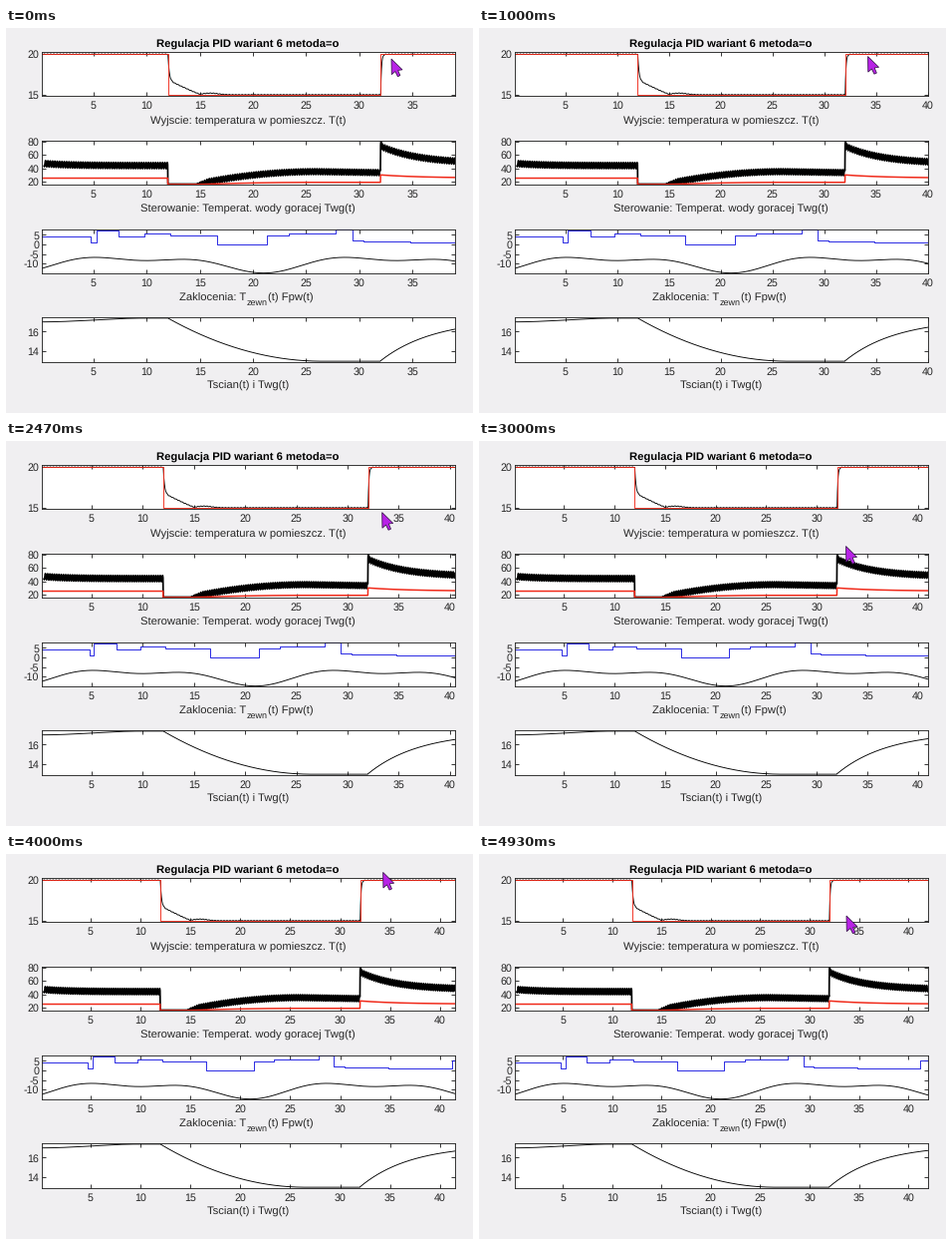
Recreate the animation shown at these times as a matplotlib script. Size 469 px wide and 386 px high, loop 4.99 s.

```python
import numpy as np
import matplotlib.pyplot as plt
from matplotlib.animation import FuncAnimation
from matplotlib.patches import Polygon

W, H, DPI = 469, 386, 64
PX = 72 / DPI                      # points per pixel
LOOP, FRAMES = 4990, 75
T0, DROP, RISE = 0.1, 12, 32       # start and the two set point changes
INK, RED = "#262626", "#f02818"
MID = 243.2

plt.rcParams.update({"font.family": "Liberation Sans",
                     "text.hinting": "none", "axes.unicode_minus": False})
fig = plt.figure(figsize=(W / DPI, H / DPI), dpi=DPI, facecolor="#f0eff1")


def panel(row, ylim, yticks):
    bottom = 68.3 + 88.8 * row
    ax = fig.add_axes([35.5 / W, 1 - bottom / H, 415.5 / W, 44.3 / H])
    ax.set_ylim(*ylim)
    ax.set_yticks(yticks)
    ax.tick_params(direction="in", top=True, right=True, length=4 * PX,
                   width=0.9 * PX, color=INK, labelcolor=INK,
                   labelsize=10.6 * PX)
    ax.tick_params(axis="x", pad=4.8 * PX)
    ax.tick_params(axis="y", pad=2.2 * PX)
    for side in ax.spines.values():
        side.set(linewidth=0.9 * PX, color=INK)
    return ax


def phases(before, between, after):
    return np.where(t < DROP, before, np.where(t < RISE, between, after))


def decay(start, tau):
    return np.exp(-np.clip(t - start, 0, None) / tau)


def draw(ax, x, y, color="black", width=0.9, **kw):
    ax.plot(x, y, color=color, linewidth=width * PX, **kw)


t = np.arange(T0, 42.3, 0.02)

# Room temperature and its set point
room = panel(0, (14.83, 20.28), [15, 20])
s = t - DROP
cooling = (15 + 3.2 * decay(DROP, 0.12) + 1.8 * np.clip(1 - s / 3, 0, 1)
           + 0.2 * np.exp(-(s - 4) ** 2))
draw(room, t, phases(20, cooling, 20 - 5 * decay(RISE, 0.08))
     + 0.04 * np.sin(2 * np.pi * t / 0.3))
draw(room, [T0, DROP, RISE, 43], [20, 15, 20, 20], RED,
     drawstyle="steps-post")

# Heating water
water = panel(1, (15.5, 81.5), [20, 40, 60, 80])
climb = 1 - np.clip((26 - t) / 11.3, 0, 1) ** 2
mean = phases(44 + 3.5 * decay(0, 2.5),
              16.5 + 18.5 * climb - 0.25 * np.clip(t - 26, 0, None),
              47 + 26 * decay(RISE, 3.6))
amp = phases(4.7, 4.5 * np.clip((t - 14.6) / 1.2, 0, 1), 4.7)
band = mean + amp * np.sin(2 * np.pi * t / 0.22)
band[np.abs(t - RISE - 0.04) < 0.03] = 80
band[t < 0.35] = np.nan
draw(water, t, band, width=1.7)
draw(water, t, phases(25.3, 15.8 + 3.2 * climb,
                      25.5 + 4.6 * decay(RISE, 4)), RED, 1.5)

# Disturbances
noise = panel(2, (-15.2, 8.1), [-10, -5, 0, 5])
edges = [T0, 4.78, 5.25, 7.4, 9.75, 12.2, 16.6, 21.35, 23.4, 27.8, 29.35,
         30.4, 34.8, 41.2, 43]
flow = [4.3, 1, 7.6, 4.3, 6, 4.5, 0, 4.7, 6, 7.9, 2.3, 1.5, 0.8, 5.3, 5.3]
draw(noise, edges, flow, "#1818e0", drawstyle="steps-post")
u = 2 * np.pi * (t - 9.7) / 23.5
draw(noise, t, -9.92 + 3.25 * np.cos(u) - 1.83 * np.cos(2 * u)
     - 0.8 * np.sin(u) + 0.25 * np.sin(2 * u))

# Wall temperature
wall = panel(3, (12.84, 17.47), [14, 16])
draw(wall, t, phases(17.22 - 0.2 * np.cos(np.pi * np.clip(t / 10, 0, 1)),
                     12.9 + 4.52 * np.clip((26.5 - t) / 14.5, 0, 1) ** 2,
                     12.95 + 4.4 * (1 - decay(RISE, 5))))

# Captions and pointer, in pixels from the top left corner
stage = fig.add_axes([0, 0, 1, 1], zorder=5)
stage.set(xlim=(0, W), ylim=(H, 0))
stage.axis("off")
LABEL = dict(color=INK, fontsize=11.3 * PX)


def caption(y, text, **kw):
    stage.text(MID, y, text, ha="center", va="baseline", **{**LABEL, **kw})


caption(19.6, "Regulacja PID wariant 6 metoda=o", color="black",
        weight="bold")
caption(96.4, "Wyjscie: temperatura w pomieszcz. T(t)")
caption(185.1, "Sterowanie: Temperat. wody goracej Twg(t)")
caption(361.8, "Tscian(t) i Twg(t)")

# Caption with a subscript, each piece placed after the one before
head = stage.text(174.5, 273.8, "Zaklocenia: T", va="baseline", **LABEL)
sub = stage.annotate("zewn", (1, 0), xycoords=head, xytext=(0, -4 * PX),
                     textcoords="offset points", va="bottom", color=INK,
                     fontsize=9 * PX)
stage.annotate("(t) Fpw(t)", (1, 0), xycoords=(sub, head), va="bottom",
               **LABEL)

ARROW = 0.92 * np.array([(0, 0), (0.3, 17), (4.2, 13.6), (7, 19.2),
                         (9.6, 18), (7.2, 12.4), (12, 11.8)])
pointer = Polygon(ARROW, facecolor="#b822e6", edgecolor="#3c1850",
                  linewidth=0.8 * PX, joinstyle="miter")
stage.add_patch(pointer)

# Pointer path: frame, x, y
PATH = np.array([(11, 387, 31), (15, 390.5, 28.5), (28, 388, 33.5),
                 (45, 368.5, 105.5), (54, 356.5, 58.5), (62, 386, 5),
                 (67, 388.5, 22.5), (74, 369, 62)]).T
GROWTH = [3, 15, 28, 41, 58, 71]   # frames where half a unit is added


def update(k):
    end = 39 + 0.5 * np.searchsorted(GROWTH, k, side="right")
    for ax in (room, water, noise, wall):
        ax.set_xlim(T0, end)
        ax.set_xticks(np.arange(5, end + 0.01, 5))
    pointer.set_xy(ARROW + [np.interp(k, PATH[0], axis) for axis in PATH[1:]])
    return [pointer]


anim = FuncAnimation(fig, update, frames=FRAMES, interval=LOOP / FRAMES,
                     repeat=True, repeat_delay=0, blit=False)
plt.show()
```
